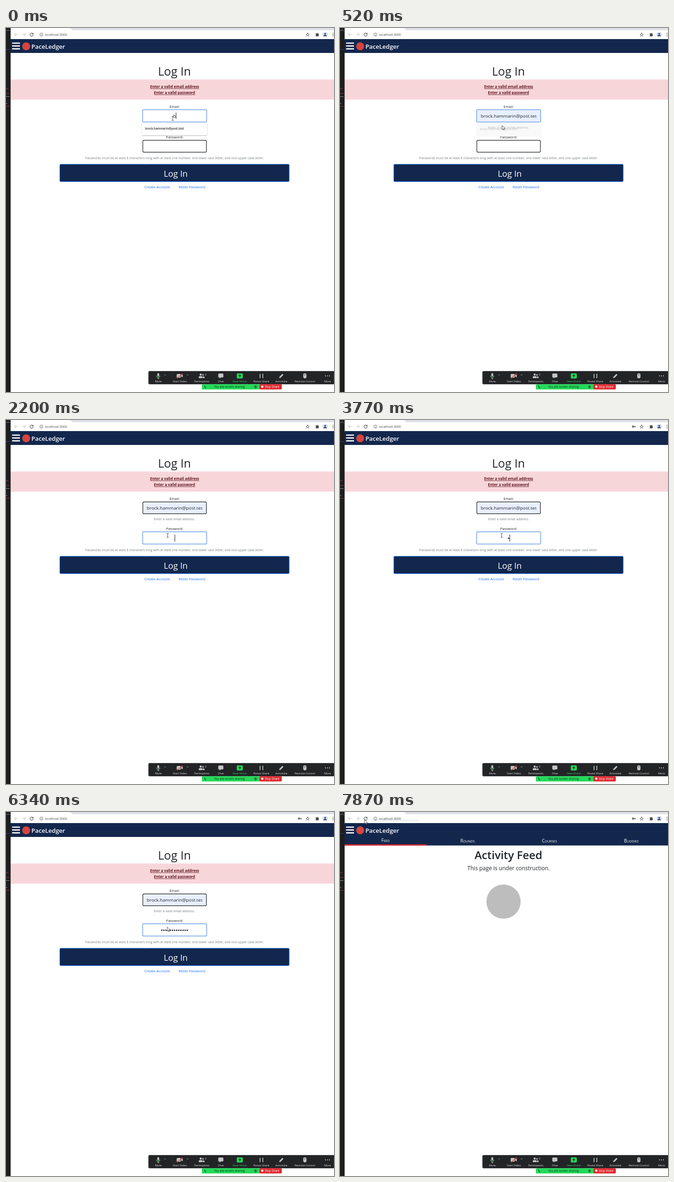
Animation of 710 by 788 pixels, one loop 8000 ms. Source, as an HTML page:

```html
<!DOCTYPE html>
<html lang="en">
<head>
<meta charset="utf-8">
<title>Log in demo</title>
<style>
  html, body { margin: 0; width: 100%; height: 100%; overflow: hidden; background: #fff; }
  svg { display: block; width: 710px; height: 788px; font-family: "Open Sans", "Noto Sans", sans-serif; }
  text { fill: #212529; }
  .mid text, text.mid { text-anchor: middle; }
  .body { font-size: 7.8px; }
  .body .link { fill: #0d6efd; }
  .hint { font-size: 6.95px; }
  .body .hint, text.hint { fill: #767c82; }
  .alert text { font-size: 7.9px; font-weight: 700; fill: #611820; text-decoration: underline; }
  .tabs text { font-size: 10px; font-variant: small-caps; fill: #fff; }
  .labels text { font-size: 6px; fill: #e6e6e6; }
  .line { fill: none; stroke-linecap: round; stroke-linejoin: round; }
  .field { stroke: #15171a; stroke-width: 1.2; }
  .field.focus { stroke: #8db5f0; stroke-width: 2; }
</style>
</head>
<body>
<svg viewBox="0 0 710 788">
  <defs>
    <filter id="soft" x="-10%" y="-30%" width="120%" height="170%">
      <feDropShadow dx="0" dy="1" stdDeviation="1" flood-opacity=".3"/>
    </filter>
    <clipPath id="emailClip"><rect x="300" y="178" width="125" height="25"/></clipPath>
  </defs>
  <rect width="710" height="788" fill="#fff"/>

  <!-- editor edge -->
  <rect width="10" height="788" fill="#1e1e1e"/>
  <g fill="#c8c8c8">
    <rect x="1" y="4.5" width="1.4" height="1.2"/><rect x="3.6" y="4.5" width="1.4" height="1.2"/><rect x="6.2" y="4.5" width="1.4" height="1.2"/>
  </g>
  <rect y="46" width="8" height="1" fill="#2c3f78"/>
  <g fill="#8e3a3a"><rect y="131" width="6" height="1"/><rect y="141" width="8" height="1"/><rect y="169" width="9" height="1"/></g>
  <g fill="#8c8c8c"><rect y="148" width="8" height="1"/><rect y="163" width="3" height="1"/></g>

  <!-- browser bar -->
  <path d="M136 0H710V5H146Q142 5 141 2Q140 0 136 0Z" fill="#dee1e6"/>
  <rect id="strip" x="68" y="16" width="102" height="5" rx="1" fill="#f1f3f4"/>
  <g class="line" stroke="#b9bcc0">
    <path d="M25.2 14.2H18.4M21.6 11L18.4 14.2L21.6 17.4"/>
    <path d="M35.2 14.2H42M38.8 11L42 14.2L38.8 17.4"/>
  </g>
  <path class="line" d="M58.4 12.2A3.5 3.5 0 1 0 59 15.2" stroke="#4a4d51" stroke-width="1.1"/>
  <path d="M59.4 10.2V13.7H55.9Z" fill="#4a4d51"/>
  <circle cx="76.6" cy="14.3" r="3.4" fill="none" stroke="#5f6368" stroke-width=".9"/>
  <path d="M76.6 12.4V13.2M76.6 14V16.3" stroke="#5f6368"/>
  <text x="84.5" y="16.8" font-size="7.05" style="fill:#45484c">localhost:3000</text>
  <g id="key" stroke="#4a4d51" fill="none">
    <circle cx="634.2" cy="14.2" r="1.5" stroke-width="1.4"/>
    <path d="M635.8 14.2H640M638.6 14.2V16" stroke-width="1.4"/>
  </g>
  <path class="line" d="M653 10.6L654 13.2L656.8 13.4L654.6 15.1L655.4 17.8L653 16.3L650.6 17.8L651.4 15.1L649.2 13.4L652 13.2Z" stroke="#55585c" stroke-width=".9"/>
  <path d="M670.3 12H672.3A1.4 1.4 0 0 1 675 12H676.6V13.8A1.4 1.4 0 0 1 676.6 16.4V18H670.3V16A1.2 1.2 0 0 0 670.3 13.7Z" fill="#4a4d51"/>
  <circle cx="690.8" cy="14.3" r="5.6" fill="#c9d8f2"/>
  <circle cx="690.8" cy="12.6" r="1.7" fill="#25395f"/>
  <path d="M687.3 17.4Q687.5 15 690.8 15T694.3 17.4Z" fill="#25395f"/>
  <g fill="#4a4d51"><circle cx="708" cy="11.4" r=".9"/><circle cx="708" cy="14.3" r=".9"/><circle cx="708" cy="17.2" r=".9"/></g>

  <!-- site header -->
  <rect x="10" y="24" width="700" height="30" fill="#13274d"/>
  <path d="M13.2 32.7H30.2M13.2 38.9H30.2M13.2 45.1H30.2" stroke="#fff" stroke-width="2.6"/>
  <circle cx="43.6" cy="39.6" r="8.6" fill="#d4453f"/>
  <text x="55" y="44.6" font-size="13.1" font-weight="600" style="fill:#fff">PaceLedger</text>

  <!-- login page -->
  <g id="login" class="body mid">
    <text x="364.6" y="103" font-size="25.2">Log In</text>
    <rect x="10" y="111.5" width="700" height="43.5" fill="#f7d6d9"/>
    <g class="alert">
      <text x="365" y="130">Enter a valid email address</text>
      <text x="364.8" y="143">Enter a valid password</text>
    </g>
    <text x="365" y="173">Email:</text>
    <rect id="email" class="field" rx="2.5"/>
    <g clip-path="url(#emailClip)">
      <text id="typed" x="361.8" y="194" font-size="9.85" style="text-anchor:start">b</text>
      <text id="filled" x="304.8" y="194" font-size="9.85" style="text-anchor:start">brock.hammarin@post.test</text>
    </g>
    <g id="below">
      <text class="hint" x="364.8" y="217.4">Enter a valid email address.</text>
      <text x="365" y="238.2">Password:</text>
    </g>
    <rect id="pass" class="field" fill="#fff" rx="2.5"/>
    <g id="dots" fill="#16181b"></g>
    <text class="hint" x="364.8" y="283.6">Passwords must be at least 8 characters long with at least one number, one lower case letter, and one upper case letter.</text>
    <rect x="116.5" y="295" width="496.5" height="37.5" rx="2" fill="#13274d" stroke="#0d6efd"/>
    <text x="367.4" y="321.8" font-size="18.4" style="fill:#fff">Log In</text>
    <text class="link" x="327.2" y="347">Create Account</text>
    <text class="link" x="402.4" y="347">Reset Password</text>
    <g id="list">
      <rect x="294.5" y="205" width="140.5" height="27" fill="#fff" filter="url(#soft)"/>
      <rect id="hover" x="294.5" y="207" width="140.5" height="22" fill="#ededed"/>
      <text x="301" y="220.4" font-size="6.4" font-weight="600" style="text-anchor:start">brock.hammarin@post.test</text>
    </g>
    <g id="fade">
      <rect x="294" y="205" width="142" height="30" fill="#f3f3f3" opacity=".5"/>
      <text x="303" y="220.6" font-size="6.4" style="text-anchor:start;fill:#b9bbbd">brock.hammarin@post.test</text>
    </g>
    <rect id="caret" width="1" fill="#111"/>
  </g>

  <!-- feed page -->
  <g id="feed" class="mid">
    <rect x="10" y="53" width="700" height="19.5" fill="#13274d"/>
    <rect x="10" y="70" width="177" height="2.5" fill="#e8212b"/>
    <g class="tabs">
      <text x="98.5" y="65.4">Feed</text>
      <text x="276" y="66.4">Rounds</text>
      <text x="453.4" y="66.4">Courses</text>
      <text x="630.6" y="66.4">Buddies</text>
    </g>
    <text x="364.6" y="102.4" font-size="23.9" font-weight="600">Activity Feed</text>
    <text x="364.8" y="126.4" font-size="12">This page is under construction.</text>
    <circle cx="354" cy="194" r="37" fill="#bdbdbd"/>
  </g>

  <!-- meeting bar -->
  <rect x="308" y="742.5" width="410" height="29" rx="3" fill="#232426" stroke="#c9c9c9" stroke-width=".8"/>
  <g class="labels mid">
    <text x="329.7" y="767.2">Mute</text>
    <text x="376.5" y="767.2">Start Video</text>
    <text x="423.7" y="767.2">Participants</text>
    <text x="465" y="767.2">Chat</text>
    <text x="506" y="767.2" style="fill:#23d959">New Share</text>
    <text x="552.7" y="767.2">Pause Share</text>
    <text x="596" y="767.2">Annotate</text>
    <text x="647" y="767.2">Remote Control</text>
    <text x="696" y="767.2">More</text>
    <text x="432.3" y="751.6">2</text>
  </g>
  <g fill="#c4c4c4">
    <rect x="327.7" y="747" width="3.8" height="8" rx="1.9"/>
    <rect x="369.5" y="749" width="8.6" height="8" rx="1.5"/>
    <path d="M378.8 752L382.5 749.6V756.4L378.8 754Z"/>
    <circle cx="421.4" cy="750.2" r="2.2"/><path d="M417.3 758V755.6Q417.3 753.4 421.4 753.4T425.5 755.6V758Z"/>
    <circle cx="426.4" cy="751" r="1.7"/><path d="M426.4 758V754Q429.8 753.9 429.8 756V758Z"/>
    <path d="M461 748H469Q470.5 748 470.5 749.5V755Q470.5 756.5 469 756.5H465L462.3 759V756.5H461Q459.5 756.5 459.5 755V749.5Q459.5 748 461 748Z"/>
    <rect x="549" y="748.5" width="1.7" height="9.5"/><rect x="555" y="748.5" width="1.7" height="9.5"/>
    <path d="M591.3 758L592 755L598.2 748.8L600.5 751.1L594.3 757.3Z"/>
    <rect x="643.4" y="747.5" width="7" height="11" rx="3.4"/>
    <circle cx="691.5" cy="753.2" r="1.1"/><circle cx="695.8" cy="753.2" r="1.1"/><circle cx="700.1" cy="753.2" r="1.1"/>
  </g>
  <path d="M646.9 749V752.4" stroke="#232426"/>
  <rect id="level" x="328" y="753.6" width="3.2" height="1.4" rx=".6" fill="#23d959"/>
  <path class="line" d="M326 753Q326 757 329.6 757T333.2 753M329.6 757V759M327.8 759.2H331.4" stroke="#c4c4c4" stroke-width=".9"/>
  <path class="line" d="M370.5 758.5L382 747.8" stroke="#e8363d" stroke-width="1.2"/>
  <path class="line" d="M342.8 751.8L344.5 750.2L346.2 751.8M391.3 751.8L393 750.2L394.7 751.8" stroke="#b0b0b0" stroke-width=".8"/>
  <rect x="499.6" y="747.8" width="13" height="11" rx="2" fill="#23d959"/>
  <path class="line" d="M506.1 756.2V750.8M503.7 753L506.1 750.6L508.5 753" stroke="#1d2a20" stroke-width="1.3"/>
  <rect x="424" y="771.2" width="125" height="11.3" rx="2" fill="#23d959"/>
  <rect x="548.5" y="771.2" width="48.5" height="11.3" rx="2" fill="#e0282e"/>
  <path class="line" d="M429.6 774.8Q430 778 432.6 779" stroke="#12351c" stroke-width="1.3"/>
  <path d="M540.2 774L542.8 775V777.4Q542.6 779.4 540.2 780.4Q537.8 779.4 537.6 777.4V775Z" fill="#17692f"/>
  <path class="line" d="M539 777.2L540 778.2L541.6 776.2" stroke="#23d959" stroke-width=".7"/>
  <rect x="552.6" y="774.2" width="4.4" height="4.4" fill="#fff"/>
  <text class="mid" x="483.7" y="779" font-size="6.3" style="fill:#10301a">You are screen sharing</text>
  <text class="mid" x="576" y="778.8" font-size="6.3" style="fill:#fff">Stop Share</text>

  <g id="beam" class="line">
    <path d="M-1.8-4.4Q0-4.4 0-3.4Q0-4.4 1.8-4.4M0-3.4V3.4M-1.8 4.4Q0 4.4 0 3.4Q0 4.4 1.8 4.4" stroke="#333" stroke-width=".9"/>
  </g>
  <path id="arrow" d="M0 0V9L2.1 7.1L3.5 10.2L5 9.5L3.6 6.5H6.4Z" fill="#fff" stroke="#333" stroke-width=".8" stroke-linejoin="round"/>
</svg>
<script>
const LOOP = 8000, CENTER = 365, DOT_STEP = 4.6;
const $ = id => document.getElementById(id);
const show = (id, on) => $(id).style.display = on ? '' : 'none';
const move = (id, x, y) => $(id).setAttribute('transform', `translate(${x} ${y})`);
const attrs = (el, map) => Object.entries(map).forEach(([k, v]) => el.setAttribute(k, v));

// Each row: start time, then the values held until the next row.
const pointer = [
  [0, 'beam', 360.8, 196], [130, 'beam', 358, 200], [260, 'arrow', 352, 209],
  [390, 'arrow', 350.8, 211], [670, 'arrow', 350.6, 218], [810, 'arrow', 350.2, 230],
  [950, 'beam', 350, 246], [1090, 'beam', 350, 249.8], [6340, 'arrow', 349, 248.8],
  [7440, 'arrow', 318, 222], [7580, 'arrow', 205, 132], [7720, 'arrow', 92, 42],
  [7870, 'arrow', 53, 16.5]
];
const typing = [
  [0, 0], [3640, 1], [4050, 2], [4190, 3], [4330, 5], [4460, 6], [4600, 8],
  [4740, 9], [4870, 11], [5010, 12], [5600, 13]
];
const blink = [
  [0, 1], [260, 0], [1090, 1], [1640, 0], [2200, 1], [2630, 0], [3120, 1], [6200, 0]
];
const voice = [
  [0, 1.4], [1210, .6], [1920, 1.4], [2200, .6], [2510, 1.4], [2750, .6], [3120, 1.4],
  [3400, .6], [3770, 1.4], [4330, .6], [4740, 1.4], [5770, .6], [6080, 1.4],
  [6750, .6], [7040, 1.4], [7580, .6], [7870, 1.4]
];
const at = (rows, t) => rows.findLast(r => r[0] <= t).slice(1);

const dots = Array.from({ length: 13 }, () => {
  const dot = document.createElementNS('http://www.w3.org/2000/svg', 'circle');
  attrs(dot, { r: 1.55, cy: 256 });
  return $('dots').appendChild(dot);
});

function field(id, top, focus) {
  const grow = focus ? .5 : 0;
  attrs($(id), {
    x: 296.2 - grow, y: top - grow, width: 137.6 + 2 * grow, height: 25.6 + 2 * grow,
    class: focus ? 'field focus' : 'field'
  });
}

function draw(t) {
  const inEmail = t < 1090, filled = t >= 260, home = t >= 6460;
  show('login', !home);
  show('feed', home);
  show('key', t >= 3640);
  show('strip', t >= 7870);

  field('email', 177.3, inEmail);
  field('pass', inEmail ? 243.2 : 242.4, !inEmail);
  $('email').setAttribute('fill', filled ? '#e8f0fe' : '#fff');
  show('typed', !filled);
  show('filled', filled);
  show('list', t < 520);
  show('hover', filled);
  show('fade', t >= 520 && t < 670);
  move('below', 0, inEmail ? 1 : 0);

  const [n] = at(typing, t);
  dots.forEach((dot, i) => {
    dot.style.display = i < n ? '' : 'none';
    dot.setAttribute('cx', CENTER - .2 + (i - (n - 1) / 2) * DOT_STEP);
  });
  show('caret', at(blink, t)[0]);
  attrs($('caret'), inEmail
    ? { x: 367.6, y: 183, height: 14 }
    : { x: Math.round(CENTER + n * DOT_STEP / 2), y: 248, height: 15 });

  $('level').setAttribute('height', at(voice, t)[0]);
  const [kind, x, y] = at(pointer, t);
  show('beam', kind === 'beam');
  show('arrow', kind === 'arrow');
  move(kind, x, y);
}

const start = performance.now();
(function tick() {
  draw((performance.now() - start) % LOOP);
  requestAnimationFrame(tick);
})();
</script>
</body>
</html>
```
